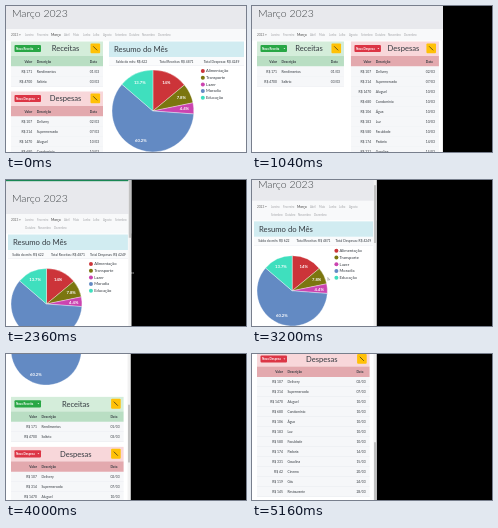
An HTML page that plays this animation: 240 px wide and 146 px high, repeating every 5.24 s.

```html
<!DOCTYPE html>
<html lang="pt">
<head>
<meta charset="utf-8">
<style>
html, body { margin: 0; width: 100%; height: 100%; overflow: hidden; background: #000; }
svg { display: block; width: 100%; height: 100%; font-family: Lato, "Open Sans", sans-serif; }
</style>
</head>
<body>
<svg id="stage" viewBox="0 0 240 146"></svg>
<script>
const LOOP = 5240;
const WIDTH_KEYS = [[0, 240], [400, 240], [560, 237.5], [1040, 191], [1160, 181],
  [1680, 143], [2240, 126], [2360, 125.4], [2800, 124.6]];
const SCROLL_KEYS = [[3050, 0], [3200, 13], [4000, 128], [4600, 210], [4900, 223]];
const PAGE_HEIGHT = 369;
const INK = '#343a40';

const MONTHS = [['Janeiro', 12], ['Fevereiro', 14], ['Março', 13], ['Abril', 9],
  ['Maio', 10], ['Junho', 10], ['Julho', 10], ['Agosto', 12], ['Setembro', 14],
  ['Outubro', 13], ['Novembro', 16], ['Dezembro', 14]];

const SLICES = [['Alimentação', 14, '#cc3439'], ['Transporte', 7.8, '#7b760f'],
  ['Lazer', 4.4, '#cb44b0'], ['Moradia', 60.2, '#638ac3'], ['Educação', 13.7, '#3fdfbe']];

const INCOME = {
  title: 'Receitas', button: 'Nova Receita', accent: '#28a745', head: '#d4edda', cols: '#b9dec3',
  rows: [[171, 'Rendimentos', '01/03'], [4700, 'Salário', '03/03']]
};
const EXPENSES = {
  title: 'Despesas', button: 'Nova Despesa', accent: '#dc3545', head: '#f8d7da', cols: '#e3a9ae',
  rows: [[107, 'Delivery', '02/03'], [314, 'Supermercado', '07/03'], [1470, 'Aluguel', '10/03'],
    [680, 'Condomínio', '10/03'], [106, 'Água', '10/03'], [183, 'Luz', '10/03'],
    [580, 'Faculdade', '10/03'], [174, 'Padaria', '14/03'], [331, 'Gasolina', '15/03'],
    [42, 'Cinema', '20/03'], [119, 'Gás', '24/03'], [145, 'Restaurante', '28/03']]
};

function track(keys, t) {
  if (t <= keys[0][0]) return keys[0][1];
  for (let i = 1; i < keys.length; i++) {
    const [t0, a] = keys[i - 1], [t1, b] = keys[i];
    if (t < t1) return a + (b - a) * (t - t0) / (t1 - t0);
  }
  return keys[keys.length - 1][1];
}

const rect = (x, y, w, h, fill, rx = 0) =>
  `<rect x="${x}" y="${y}" width="${w}" height="${h}" rx="${rx}" fill="${fill}"/>`;

// y is the vertical middle of the lowercase text
const text = (x, y, size, str, fill = INK, anchor = 'start', weight = 400) =>
  `<text x="${x}" y="${y + size * 0.34}" font-size="${size}" fill="${fill}" text-anchor="${anchor}" font-weight="${weight}">${str}</text>`;

const path = (d, fill, extra = '') => `<path d="${d}" fill="${fill}" ${extra}/>`;

const caret = (x, y, fill) => path(`M${x} ${y - .5}h1.8l-.9 1z`, fill);

function nav(width, y) {
  let out = text(5, y, 3.1, '2023', '#666') + caret(13, y, '#666');
  let x = 19, rows = 1;
  for (const [name, step] of MONTHS) {
    if (x + step - 2.5 > width - 4.5) {
      x = 19;
      y += 8.3;
      rows++;
    }
    const current = name === 'Março';
    out += text(x, y, current ? 3.5 : 2.75, name, current ? '#444' : '#a3a5a8');
    x += step;
  }
  return { out, rows };
}

function table(x, right, y, data) {
  const w = right - x, mid = y + 7;
  const valueX = x + w * .23, descX = valueX + 4.6, dateX = right - 13.2;
  let out = rect(x, y, w, 14.5, data.head) +
    rect(x + 3.5, mid - 3.6, 26.5, 7.2, data.accent, 1) +
    text(x + 5, mid, 2.95, data.button, '#fff', 'start', 700) + caret(x + 26.5, mid, '#fff') +
    text((x + 30 + right - 13) / 2, mid + .2, 7.6, data.title, INK, 'middle') +
    rect(right - 12.5, mid - 5, 9.6, 9.8, '#ffc107', 1) +
    path(`M${right - 9.8} ${mid - 2.2}l4 4`, 'none', 'stroke="#5a4a18" stroke-width=".9"') +
    rect(x, y + 14.5, w, 10.5, data.cols) +
    text(valueX, y + 20, 3.3, 'Valor', INK, 'end', 700) +
    text(descX, y + 20, 3.3, 'Descrição', INK, 'start', 700) +
    text(dateX, y + 20, 3.3, 'Data', INK, 'start', 700);
  data.rows.forEach(([value, name, date], i) => {
    const top = y + 25 + i * 10;
    out += rect(x, top, w, 10, '#f6f7f9') + rect(x, top + 9.7, w, .3, '#dee2e6') +
      text(valueX, top + 5, 3.35, 'R$ ' + value, INK, 'end') +
      text(descX, top + 5, 3.35, name) +
      text(dateX, top + 5, 3.35, date);
  });
  return out;
}

function pie(cx, cy, r) {
  const total = SLICES.reduce((sum, s) => sum + s[1], 0);
  const at = (share, k) => {
    const a = share / total * Math.PI * 2;
    return [cx + Math.sin(a) * r * k, cy - Math.cos(a) * r * k];
  };
  let from = 0, shapes = '', labels = '';
  for (const [, share, color] of SLICES) {
    const to = from + share;
    const [lx, ly] = at(from + share / 2, .77);
    shapes += path(`M${cx} ${cy}L${at(from, 1)}A${r} ${r} 0 ${share > total / 2 ? 1 : 0} 1 ${at(to, 1)}Z`,
      color, 'stroke="#fff" stroke-width=".35"');
    labels += text(lx, ly, 4.2, share + '%', '#fff', 'middle', 700);
    from = to;
  }
  return shapes + labels;
}

function summary(x, right, y) {
  const w = right - x, r = 42 - (138 - w) * .36, cx = x + 3 + r;
  let out = rect(x, y, w, 15.5, '#d1ecf1') + text(x + 5, y + 7.6, 7.7, 'Resumo do Mês') +
    rect(x, y + 15.5, w, 8.6, '#fafbfc') + rect(x, y + 24, w, .3, '#dee2e6');
  ['Saldo do mês: R$ 622', 'Total Receitas: R$ 4871', 'Total Despesas: R$ 4249'].forEach((str, i) => {
    out += text(x + w * (i + .5) / 3, y + 20, 3.3, str, INK, 'middle');
  });
  out += pie(cx, y + 69.5, r);
  SLICES.forEach(([name, , color], i) => {
    const ly = y + 29.5 + i * 6.7, lx = cx + r + 9;
    out += `<circle cx="${lx}" cy="${ly}" r="2" fill="${color}"/>` + text(lx + 3.2, ly, 4.1, name);
  });
  return out;
}

function body(width, navRows) {
  const top = 46.5 + (navRows - 1) * 8;
  if (width > 211) {
    const split = width * 5 / 12;
    return table(5, split - 3, top, INCOME) + table(5, split - 3, top + 50, EXPENSES) +
      summary(split + 3, width - 2, top);
  }
  if (width > 174) {
    const half = width / 2;
    return table(5, half - 3.5, top, INCOME) + table(half + 3.5, width - 4, top, EXPENSES) +
      summary(5, width - 4, top + 152);
  }
  return summary(2, width - 3.5, top) + table(5, width - 7, top + 116.5, INCOME) +
    table(5, width - 7, top + 166.5, EXPENSES);
}

function draw(t) {
  const width = track(WIDTH_KEYS, t), narrow = width <= 174;
  const scroll = narrow ? track(SCROLL_KEYS, t) : 11;
  const menu = nav(width, 40);
  let out = rect(0, 0, 240, 146, '#000') + rect(0, 0, width, 146, '#fff') +
    `<clipPath id="view"><rect width="${width}" height="146"/></clipPath>` +
    `<g clip-path="url(#view)"><g transform="translate(0 ${-scroll})">` +
    rect(0, 0, width, 34, '#e8e9ed') + rect(0, 0, width, 1.2, '#198754') +
    text(6, 18, 10.5, 'Março 2023', '#3c4043', 'start', 300) +
    rect(0, 34, width, 11.5 + (menu.rows - 1) * 8, '#f8f9fa') +
    menu.out + body(width, menu.rows) + '</g>';
  if (narrow) {
    const scale = 146 / PAGE_HEIGHT;
    out += rect(width - 3, 0, 3, 146, '#f1f1f1') +
      rect(width - 2.6, scroll * scale, 2.2, 146 * scale, '#c1c1c1');
  }
  out += '</g>';
  if (t >= 2280 && t < 2600) {
    const x = width + .9;
    out += path(`M${x - 1.8} 93l1.4-1v2zM${x + 1.8} 93l-1.4-1v2z`, '#bbb');
  }
  if (t >= 3000 && t < 3400) {
    out += path('M75.8 97.5v3l.8-.7 1.3 0z', '#fff', 'stroke="#333" stroke-width=".3"');
  }
  stage.innerHTML = out;
}

const stage = document.getElementById('stage');
const start = performance.now();
function tick() {
  draw((performance.now() - start) % LOOP);
  requestAnimationFrame(tick);
}
tick();
</script>
</body>
</html>
```
